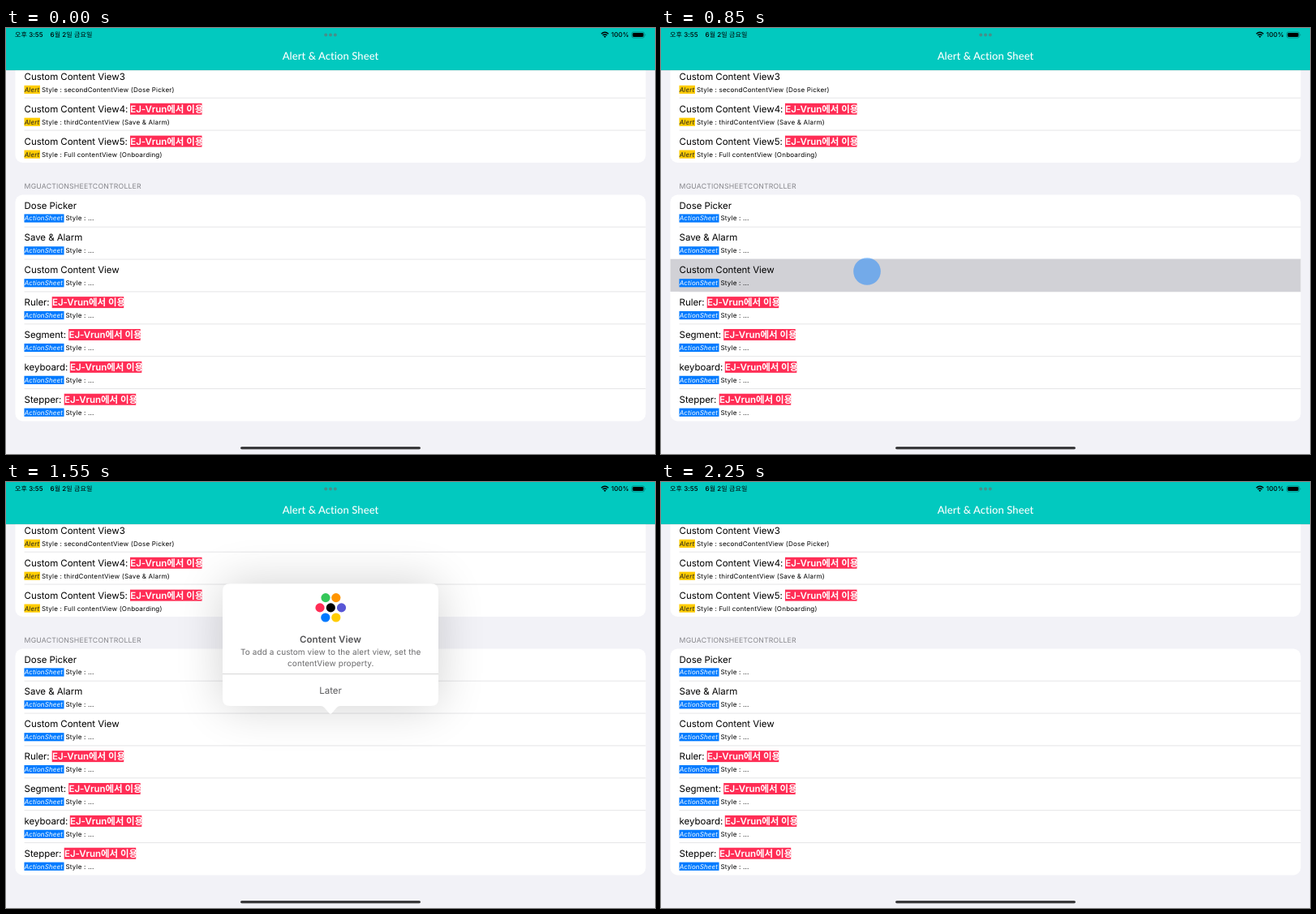
Write an HTML page that moves like this. It is 800 px wide and 525 px high and loops after 2440 ms.

```html
<!DOCTYPE html>
<html lang="ko">
<head>
<meta charset="utf-8">
<title>Alert &amp; Action Sheet</title>
<style>
  html, body { margin: 0; width: 100%; height: 100%; overflow: hidden; background: #f2f2f7; }
  svg { display: block; width: 800px; height: 525px; }
  text { font-family: Inter, "Noto Sans CJK KR", "Noto Sans CJK", sans-serif; text-rendering: geometricPrecision; white-space: pre; }
  .row { font-size: 11.5px; letter-spacing: -.05px; }
  .sub { font-size: 8.04px; letter-spacing: .2px; }
  .tag { font-style: italic; letter-spacing: .12px; }
  .mark { font-weight: 600; fill: #fff; }
  .head { font-size: 8.7px; letter-spacing: .19px; fill: #86868b; }
  .status { font-size: 8px; font-weight: 500; letter-spacing: .1px; }
  .title { font: 500 13px Lato, sans-serif; letter-spacing: .08px; fill: #fff; }
  .mid { text-anchor: middle; }
  .strong { font-weight: 600; letter-spacing: .1px; fill: #545456; }
  .msg { font-size: 10px; letter-spacing: .08px; fill: #6a6a6c; }
</style>
</head>
<body>
<svg viewBox="0 0 800 525">
  <defs>
    <filter id="soft" x="-50%" y="-80%" width="200%" height="260%">
      <feGaussianBlur stdDeviation="29"/>
    </filter>
  </defs>
  <rect width="800" height="525" fill="#f2f2f7"/>
  <rect x="11.5" y="30" width="777" height="136" rx="9" fill="#fff"/>
  <rect x="11.5" y="205.5" width="777" height="279" rx="9" fill="#fff"/>
  <g id="lines" stroke="#dcdcdf" stroke-width=".75"></g>
  <rect id="glow" x="11.5" y="284.7" width="777" height="40.2" fill="#d1d1d6"/>
  <g id="list"></g>
  <text class="head" x="22.6" y="198.3">MGUACTIONSHEETCONTROLLER</text>

  <rect width="800" height="52" fill="#02c9bf"/>
  <path d="M0 52.3H800" stroke="#000" stroke-opacity=".15" stroke-width=".6"/>
  <text class="title mid" x="400" y="38.8">Alert &amp; Action Sheet</text>
  <text class="status" x="11" y="11.2">오후 3:55</text>
  <text class="status" x="54.5" y="11.2">6월 2일 금요일</text>
  <g fill="#468f8a">
    <circle cx="394.2" cy="8.5" r="2"/><circle cx="400" cy="8.5" r="2"/><circle cx="405.8" cy="8.5" r="2"/>
  </g>
  <g fill="none" stroke="#000" stroke-width="1.4">
    <path d="M733.8 7.2Q738.2 3.2 742.6 7.2"/><path d="M735.5 9.1Q738.2 6.7 740.9 9.1"/>
  </g>
  <path d="M736.6 10.3Q738.2 9 739.8 10.3L738.2 12Z"/>
  <text class="status" x="746" y="11.2">100%</text>
  <rect x="771.4" y="4.9" width="15.4" height="7.2" rx="2.1" fill="none" stroke="#000" stroke-opacity=".4" stroke-width=".7"/>
  <rect x="772.5" y="5.9" width="13.2" height="5.2" rx="1.3"/>
  <path d="M787.7 7.3Q789.1 8.5 787.7 9.7Z" fill-opacity=".45"/>
  <rect x="289" y="515.9" width="222" height="3.4" rx="1.7" fill="#3a3a3c"/>

  <rect id="shade" x="267" y="125.3" width="266" height="151" rx="9" filter="url(#soft)"/>
  <path id="panel" fill="#fff" d="M276 125.3H524Q533 125.3 533 134.3V267Q533 276 524 276H412Q409.5 276 407.6 278L402 284.6Q400 287 398 284.6L392.4 278Q390.5 276 388 276H276Q267 276 267 267V134.3Q267 125.3 276 125.3Z"/>
  <g id="content">
    <g id="dots"></g>
    <text class="row mid strong" x="400" y="198.3">Content View</text>
    <text class="mid msg" x="400.3" y="213.2">To add a custom view to the alert view, set the</text>
    <text class="mid msg" x="400.3" y="227.3">contentView property.</text>
    <path d="M267 236.6H533" stroke="#c9c9cb" stroke-width=".8"/>
    <text class="row mid" x="400" y="260.9" fill="#5a5a5c">Later</text>
  </g>
  <g id="touch" fill="#007aff"><circle id="halo"/><circle id="core"/></g>
</svg>
<script>
const LOOP = 2440, STEP = 50, PITCH = 39.87;
const $ = id => document.getElementById(id);

function add(parent, name, attrs, text) {
  const el = document.createElementNS('http://www.w3.org/2000/svg', name);
  set(el, attrs);
  if (text) el.textContent = text;
  parent.append(el);
}
function set(el, attrs) {
  for (const key in attrs) el.setAttribute(key, attrs[key]);
}

const alertTag = { name: 'Alert', width: 19.5, fill: '#ffcc00', ink: '#1c1c1e' };
const sheetTag = { name: 'ActionSheet', width: 49, fill: '#007aff', ink: '#fff' };

function addRow(y, label, markX, tag, detail) {
  const list = $('list');
  add(list, 'text', { class: 'row', x: 22.6, y: y + 4.1 }, label);
  if (markX) {
    add(list, 'rect', { x: markX, y: y - 7, width: 88.5, height: 14, fill: '#ff2d55' });
    add(list, 'text', { class: 'row mark', x: markX + .3, y: y + 4.1 }, 'EJ-Vrun에서 이용');
  }
  add(list, 'rect', { x: 22.5, y: y + 10.9, width: tag.width, height: 10.2, fill: tag.fill });
  add(list, 'text', { class: 'sub tag', x: 22.7, y: y + 18.9, fill: tag.ink }, tag.name);
  add(list, 'text', { class: 'sub', x: 24.4 + tag.width, y: y + 18.9 }, 'Style : ' + detail);
}

[
  ['Custom Content View3', 0, 'secondContentView (Dose Picker)'],
  ['Custom Content View4:', 153, 'thirdContentView (Save & Alarm)'],
  ['Custom Content View5:', 153, 'Full contentView (Onboarding)']
].forEach(([label, x, detail], i) => addRow(59.9 + i * PITCH, label, x, alertTag, detail));

[
  ['Dose Picker'], ['Save & Alarm'], ['Custom Content View'],
  ['Ruler:', 56.7], ['Segment:', 77.2], ['keyboard:', 78.8], ['Stepper:', 71.7]
].forEach(([label, x], i) => addRow(218.5 + i * PITCH, label, x, sheetTag, '...'));

for (let i = 0; i < 8; i++) {
  const y = i < 2 ? 86.2 + i * PITCH : 245.2 + (i - 2) * PITCH;
  add($('lines'), 'path', { d: `M22.6 ${y}H788.5` });
}

[
  [394, 142.6, '#34c759'], [406.8, 142.6, '#ff9500'],
  [387, 154.9, '#ff2d55'], [400.3, 154.9, '#000'], [413.5, 154.9, '#5856d6'],
  [393.8, 167, '#007aff'], [406.8, 167, '#ffcc00']
].forEach(([cx, cy, fill]) => add($('dots'), 'circle', { cx, cy, r: 5.6, fill }));

// Linear interpolation through [time, value] pairs, clamped at both ends.
function track(keys, t) {
  if (t <= keys[0][0]) return keys[0][1];
  for (let i = 1; i < keys.length; i++) {
    const [a, u] = keys[i - 1], [b, v] = keys[i];
    if (t < b) return u + (v - u) * (t - a) / (b - a);
  }
  return keys[keys.length - 1][1];
}

const fadeOut = [[1900, 1], [1950, .86], [2050, .4], [2150, .1], [2250, 0]];
const panelFade = [[850, 0], [900, .92], [950, 1], ...fadeOut];
const contentFade = [[850, 0], [900, .35], [950, .65], [1000, .88], [1050, 1], ...fadeOut];
const glowFade = [[900, 1], [1000, .87], [1050, .76], [1150, .5], [1250, .22], [1350, .04], [1400, 0]];

// Touches are held until release, then swell and fade.
const touches = [
  { x: 254, y: 300, down: 800, up: 900 },
  { x: 459, y: 306.5, down: 1750, up: 1888 }
];
const haloSize = [[-100, 16.6], [0, 17], [150, 28], [300, 33]];
const haloFade = [[0, .45], [30, .34], [150, .16], [300, 0]];
const coreFade = [[-40, 0], [0, .05], [90, 0]];

function draw(t) {
  set($('glow'), { opacity: t < 850 ? 0 : track(glowFade, t) });
  set($('panel'), { opacity: track(panelFade, t) });
  set($('shade'), { opacity: .18 * track(panelFade, t) });
  set($('content'), { opacity: track(contentFade, t) });
  const touch = touches.find(p => t >= p.down && t < p.up + 300);
  set($('touch'), { visibility: touch ? 'visible' : 'hidden' });
  if (!touch) return;
  const age = t - touch.up;
  set($('touch'), { transform: `translate(${touch.x} ${touch.y})` });
  set($('halo'), { r: track(haloSize, age), opacity: track(haloFade, age) });
  set($('core'), { r: 8, opacity: track(coreFade, age) });
}

function tick() {
  const t = performance.now() % LOOP;
  draw(Math.floor(t / STEP) * STEP);
  requestAnimationFrame(tick);
}
tick();
</script>
</body>
</html>
```
